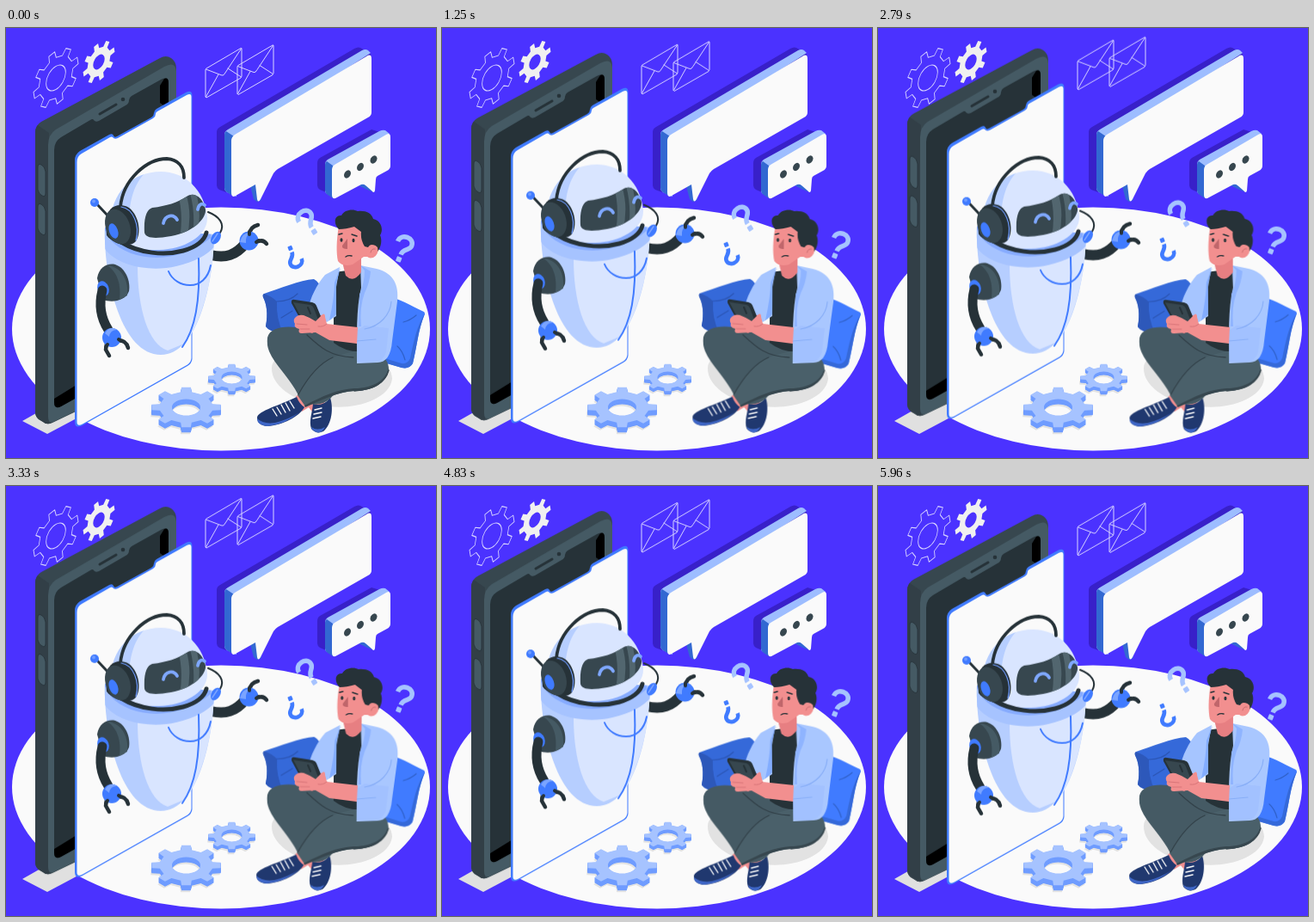
An HTML page for the animation above (6 s loop, 500x500 px).

```html
<!DOCTYPE html>
<html lang="en">
<head>
<meta charset="utf-8">
<title>Chatbot assistant</title>
<style>
html, body { margin: 0; width: 100%; height: 100%; overflow: hidden; background: #4b32ff; }
svg { display: block; width: 100vw; height: 100vh; }
.float { animation: float 6s linear infinite; }
.quick { animation-duration: 3s; }
.sway { transform-origin: 393px 342px; animation: sway 3s linear infinite; }
@keyframes float { 50% { transform: translateY(-10px); } }
@keyframes sway {
  0%, 100% { transform: rotate(0); }
  25% { transform: rotate(1deg); }
  75% { transform: rotate(-1deg); }
}
.line { fill: none; stroke-linecap: round; stroke-linejoin: round; }
.ink { stroke: #263238; }
.blue { stroke: #407bff; }
.lace { stroke: #fafafa; stroke-width: 1.4; }
</style>
</head>
<body>
<svg viewBox="0 0 500 500">
<defs>
  <g id="ask">
    <path class="line" style="stroke-linecap:butt" stroke="currentColor" stroke-width="5.5" d="M-9-5C-9-16 8-16 8-6C8 0 0 0 0 8"/>
    <rect x="-3" y="11" width="6" height="6" rx="1" fill="currentColor"/>
  </g>
  <g id="mail" class="line" stroke="#d9d5ff" stroke-width="1">
    <path d="M1 24L41 .5Q42 0 42 1V33L41 35L1 58L0 57V26Z"/>
    <path d="M.5 25L19 32Q21 33 23 29L41.500 1M.500 57L15 31M41.500 34L26 24"/>
  </g>
  <clipPath id="egg"><path d="M115 232C113 285 132 380 180 380C222 380 241 300 242 240Z"/></clipPath>
  <clipPath id="dome"><path d="M122 240C117 196 144 167 180 167C208 167 231 188 234 220C235 242 207 257 178 258C150 259 126 251 122 240Z"/></clipPath>
  <clipPath id="visor"><path d="M161 238C160 219 164 211 170 209C187 207 199 203 210 196C218 190 229 196 232 211C233 221 219 237 192 242C174 245 163 245 161 238Z"/></clipPath>
</defs>

<rect width="500" height="500" fill="#4b32ff"/>
<ellipse cx="250" cy="350" rx="243" ry="141.500" fill="#fafafa"/>
<path d="M19 457L48 472L95 447L70 428Z" fill="#e0e0e0"/>
<path d="M309 395C310 376 350 368 385 370C425 374 449 390 449 408C446 432 405 444 375 440C340 437 308 418 309 395Z" fill="#e2e2e2"/>

<g id="gears"></g>

<!-- phone -->
<g class="float">
  <path d="M34 122Q34 113 41 109L179 35Q186 31 192 35Q198 39 198 47V390L54 459Q48 462 43 458L38 455Q34 452 34 446Z" fill="#37474f"/>
  <path d="M34 122Q34 116 37 113L50 122V460Q46 461 43 458L38 455Q34 452 34 446Z" fill="#323f47"/>
  <path d="M49 136Q49 124 58 118L184 45Q197 38 198 50V388L57 457Q49 461 49 452Z" fill="#455a64"/>
  <path d="M56 142Q56 132 64 127L98 107Q101 105 102 107Q104 110 108 108L139 90Q143 88 143 84Q143 81 146 79L180 60Q189 55 189 64V370L64 440Q56 444 56 435Z" fill="#263238"/>
  <path d="M179 67L184 59Q189 57 189 64V94L179 87ZM56 431L82 415V430L64 440Q56 444 56 435Z" fill="#000"/>
  <path class="line ink" stroke-width="3" d="M109 100L128 89"/>
  <circle cx="136" cy="83" r="2.300" fill="#263238"/>
  <g fill="#455a64" stroke="#263238" stroke-width=".8">
    <path d="M37 162Q37 157 41 159T46 167V192Q46 197 42 195T37 188Z"/>
    <path d="M37 208Q37 203 41 205T46 213V237Q46 242 42 240T37 233Z"/>
  </g>
  <path d="M80 154Q80 147 86 143L120 124Q124 122 125 125Q126 128 129 126L169 104Q172 102 172 99Q172 96 175 94L209 75Q216.500 71 216.500 79V385Q216 390 211 393L88 462.500Q80 466 80 458Z" fill="#407bff"/>
  <path d="M82.500 156Q82.500 149 88 146L121 127Q123 126 124 127Q126 130 130 128L171 105Q174 103 174 100Q174 98 176 97L210 78Q215.500 75 215.500 80V384Q215 389 211 391.500L89 460.500Q82.500 464 82.500 458Z" fill="#fafafa"/>
</g>

<!-- robot -->
<g class="float quick">
  <path class="line ink" stroke-width="12" style="stroke-linecap:butt" d="M238 264C256 268 267 264 278 251"/>
  <g clip-path="url(#egg)">
    <rect x="110" y="225" width="140" height="160" fill="#b6ceff"/>
    <path d="M153 277C153 325 165 368 188 375L212 365Q240 310 244 240Z" fill="#d9e5ff"/>
    <path d="M112 230L115 257C130 277 168 284 198 277C221 272 237 262 244 252V230Z" fill="#a6c3ff"/>
    <path d="M112 230L122 247C145 272 200 276 238 244V230Z" fill="#86abff"/>
  </g>
  <path class="line blue" stroke-width="2" d="M189 283C197 303 232 308 238 276M224 268C226 318 220 350 205 371"/>

  <g clip-path="url(#dome)">
    <rect x="115" y="160" width="125" height="100" fill="#d9e5ff"/>
    <path d="M115 160H172C149 176 139 199 144 260H115Z" fill="#b6ceff"/>
  </g>
  <path class="line ink" stroke-width="5" d="M134 249C155 262 184 265 206 259C221 255 231 247 233 238"/>
  <g clip-path="url(#visor)">
    <rect x="158" y="180" width="80" height="70" fill="#37474f"/>
    <path d="M199 190L207 186Q218 214 210 245H202Q207 215 199 190ZM212 186L219 184Q229 214 222 241L217 243Q221 211 212 186Z" fill="#52666f"/>
  </g>
  <g class="line" stroke="#7fa8ff" stroke-width="3.800">
    <path d="M183 227C185 217 195 216 199 223"/>
    <path d="M223 211C224 205 228 203 231 206"/>
  </g>
  <path class="line ink" stroke-width="3.800" d="M133 208C136 176 164 152 187 152C200 153 207 161 207 174"/>
  <path class="line ink" stroke-width="3" d="M120 220L105 204"/>
  <circle cx="103" cy="203" r="5" fill="#407bff"/>
  <circle cx="102" cy="201.500" r="2" fill="#6e9cff"/>
  <path d="M116 224C118 208 130 202 143 209C155 218 158 240 150 249C142 256 124 251 117 241Z" fill="#263238"/>
  <path d="M134 208C148 210 156 230 151 247" class="line" stroke="#6f9cff" stroke-width="1.200"/>
  <ellipse cx="130" cy="231" rx="14" ry="21" transform="rotate(-20 130 231)" fill="#37474f"/>
  <ellipse cx="125" cy="236" rx="5" ry="9" transform="rotate(-20 125 236)" fill="#407bff"/>
  <path class="line ink" stroke-width="2" d="M235 214C248 219 255 228 249 238"/>
  <ellipse cx="244" cy="244" rx="5" ry="8" transform="rotate(32 244 244)" fill="#407bff"/>
  <path class="line" stroke="#80a7ff" stroke-width="1.500" d="M240 248L246 239"/>

  <path d="M106 291C108 278 118 273 127 275C139 279 145 294 143 306C139 317 124 320 113 316Z" fill="#37474f"/>
  <path d="M118 276C136 278 143 296 141 311L132 316C134 298 130 285 118 276Z" fill="#455a64"/>
  <ellipse cx="113" cy="303" rx="6.500" ry="9" transform="rotate(-20 113 303)" fill="#407bff"/>
  <path class="line ink" stroke-width="11" d="M112 305C108 321 110 337 119 351"/>
  <g class="line ink" stroke-width="4.500">
    <path d="M117 367L116 374L120 381M130 363Q140 363 142 372"/>
    <path d="M283 240Q284 231 293 229M291 249Q299 245 303 251"/>
  </g>
  <circle cx="123" cy="360" r="11" fill="#407bff"/>
  <circle cx="282.500" cy="247.500" r="11" fill="#407bff"/>
  <path d="M115 355Q121 345 129 351Q121 351 120 359ZM272 249Q275 237 284 238Q278 242 279 250Z" fill="#7aa4ff"/>
  <path class="line ink" stroke-width="4" d="M118 368L116 371M131 362L134 364M283 240L283 237M291 249L294 247"/>
</g>

<!-- speech bubbles -->
<g fill="#3820c9">
  <path d="M245 121Q245 117 249 115L405 24Q410 21 414 24L424 30V96L302 162L286 182L256 191L248 188Q245 186 245 183Z"/>
  <path d="M362 157Q362 153 365 151L425 118L438 122V155L408 180L372 191L365 188Q362 186 362 183Z"/>
</g>
<path d="M254 124Q254 120 258 118L414 26Q418 24 421 26L424 29L268 130V196L257 191Q254 189 254 186Z" fill="#9dbdff"/>
<path d="M254 124Q254 121 256 120L265 126V196L257 191Q254 189 254 186ZM284 184L291 180L297 200L292 202L288 199Z" fill="#3268d2"/>
<path d="M262 131Q262 127 266 124L419 33Q425 29 425 36V98Q425 102 421 104L316 164Q313 166 311 169L296 199Q293 204 292 199L290 182L267 195Q262 198 262 191Z" fill="#fafafa"/>
<path d="M371 159Q371 155 374 153L434 120Q438 118 441 119L446 123L383 163V197L374 193Q371 192 371 189Z" fill="#9dbdff"/>
<path d="M371 159Q371 156 373 155L380 160V198L374 194Q371 192 371 189ZM410 183L417 179L428 191L420 188Z" fill="#3268d2"/>
<path d="M379 165Q379 161 382 159L442 124Q447 121 447 127V160Q447 164 443 166L432 172Q430 173 430 176L429 189Q428 193 425 189L418 183Q416 181 413 182L383 198Q379 199 379 194Z" fill="#fafafa"/>
<g fill="#37474f">
  <ellipse cx="397" cy="170" rx="3.600" ry="5" transform="rotate(30 397 170)"/>
  <ellipse cx="412" cy="161.500" rx="3.600" ry="5" transform="rotate(30 412 161.500)"/>
  <ellipse cx="427.500" cy="153" rx="3.600" ry="5" transform="rotate(30 427.500 153)"/>
</g>

<!-- seated man -->
<g class="sway">
  <path d="M300 309C318 303 342 293 358 292Q365 295 370 310L365 350L318 354Q306 353 302 347C305 332 303 321 299 313Q298 310 300 309Z" fill="#3569d9"/>
  <path d="M300 309Q309 312 315 318Q314 338 322 354Q307 354 302 347C305 332 303 321 299 313Q298 310 300 309Z" fill="#2d58ba"/>
  <path d="M315 318Q330 318 339 309M320 337L333 329" class="line" stroke="#2b55b4" stroke-width="1.200"/>
  <path d="M448 313C462 317 477 326 486 330Q488 332 486 335C479 352 478 370 473 390Q469 397 460 395L430 386Z" fill="#407bff"/>
  <path d="M487 332C479 352 478 370 473 390Q469 397 460 395L432 387L440 384L460 390Q467 391 470 384C474 365 478 345 487 332Z" fill="#3569d9"/>
  <path d="M462 342Q470 340 477 334M455 370Q461 375 464 386" class="line" stroke="#2f60c8" stroke-width="1.200"/>

  <path d="M337 428L350 423L357 438L344 446ZM346 434L368 428L372 440L356 446Z" fill="#f28f8f"/>
  <path d="M357 437Q368 441 377 430C381 442 379 461 369 469Q361 473 355 466C352 457 356 448 357 437Z" fill="#20386f"/>
  <path d="M355 464Q362 469 371 464Q367 472 361 470Q356 468 355 464Z" fill="#3e66c7"/>
  <path class="line lace" d="M359 444L367 442M358 449L367 447M357 454L366 452"/>
  <path d="M338 429Q341 437 347 441C341 452 321 462 304 463Q292 462 292 453C293 445 318 439 338 429Z" fill="#20386f"/>
  <path d="M292 454Q299 461 313 459Q329 455 341 447Q325 461 304 463Q292 462 292 454Z" fill="#3e66c7"/>
  <path class="line lace" d="M310 443L315 451M315 441L320 449M320 438L325 447M325 436L330 445M330 434L335 442"/>

  <path d="M304 360C307 347 328 345 348 350L412 368L400 405L377 431Q366 440 354 437L340 427C331 408 312 391 306 376Q303 369 304 360Z" fill="#455a64"/>
  <path d="M410 374C435 374 446 385 445 398C441 414 424 422 405 422C386 423 366 433 348 440L339 427C352 405 366 389 380 383Z" fill="#4a606a"/>
  <path class="line" stroke="#324149" stroke-width="1.300" d="M350 357C364 370 376 382 404 383M380 383C362 391 350 408 340 426M405 422C426 421 441 413 445 398"/>
  <path d="M445 394C443 409 427 419 405 419C386 420 368 428 347 439L348 441C366 433 386 423 405 422C424 422 444 415 445 394Z" fill="#37474f"/>

  <path d="M381 284L413 280L417 376Q396 378 381 366Z" fill="#263238"/>
  <path d="M388 278L371 287C361 299 354 313 351 328L373 342L384 335L384 301Z" fill="#a6c5ff"/>
  <path d="M389 278L384 297L384 333L376 340Q382 312 382 296Z" fill="#83adff"/>
  <path d="M412 276L431 280C451 285 457 299 455 318L449 364Q447 389 432 389L408 390C408 359 407 326 413 302Z" fill="#a9c7ff"/>
  <path d="M412 276L417 282Q417 296 411 310L410 347L413 347Q411 324 417 308Q423 296 424 283Z" fill="#8fb4ff"/>
  <path d="M417 346L445 349L442 377Q438 389 427 389L408 388V352Z" fill="#a2c1ff"/>
  <path class="line" stroke="#88aef7" stroke-width="1.200" d="M448 318C447 333 435 347 417 350M408 364L430 362"/>

  <path d="M391 272L395 288Q404 297 413 284V265Z" fill="#e77f82"/>
  <path d="M387 230C384 248 384 262 386 271Q391 278 403 275L416 266Q431 267 432 256L421 225Z" fill="#f28f8f"/>
  <path d="M387 234C380 227 382 217 390 218C393 211 404 210 409 213C418 212 425 215 427 222C437 224 439 235 435 241C439 250 433 261 429 263C432 254 425 248 421 255L417 254Q412 246 413 237Q409 234 405 231Q395 234 387 234Z" fill="#263238"/>
  <path d="M421 256Q427 249 432 255Q434 263 427 267Q419 269 419 262Z" fill="#f28f8f"/>
  <path d="M397 245L391 253Q390 257 397 257Z" fill="#c0666b"/>
  <g class="line ink" stroke-width="1.400">
    <path d="M387 240L391 239M402 240L408 242M395 266Q398 264 402 265"/>
  </g>
  <ellipse cx="390" cy="246.500" rx="1.500" ry="2.200" fill="#263238"/>
  <ellipse cx="404" cy="247" rx="1.500" ry="2.200" fill="#263238"/>
  <path class="line" stroke="#c96c70" stroke-width="1" d="M424 261Q425 256 429 257"/>

  <path d="M351 331L371 335L370 346L356 355L344 350Z" fill="#e77f82"/>
  <path d="M332 320Q331 315 336 316L356 319Q360 320 361 323L370 345Q370 349 366 349L350 345Q345 344 343 340Z" fill="#263238"/>
  <path d="M334 319L354 322Q357 323 358 326L366 347L350 343Q346 342 344 338Z" fill="#37474f"/>
  <path class="line ink" stroke-width="2" d="M351 325L354 332"/>
  <path d="M337 336Q340 333 346 334L353 337L360 341L368 333Q371 331 371 336L373 344L409 348L408 367L376 363L360 354L344 355Q339 355 341 350Q334 348 336 344Q333 339 337 336Z" fill="#f28f8f"/>
  <path class="line" stroke="#d87478" stroke-width="1" d="M338 344L350 345M342 350L353 350M373 344Q369 348 363 347"/>
</g>

<!-- floating marks -->
<g class="float">
  <use href="#ask" transform="translate(351 225) rotate(-32)" color="#a6c3ff"/>
  <use href="#ask" transform="translate(462 256) rotate(22)" color="#a6c3ff"/>
  <use href="#ask" transform="translate(335 267) rotate(158) scale(.85)" color="#407bff"/>
  <use href="#mail" x="232" y="23"/>
  <use href="#mail" x="269" y="19.500"/>
</g>
</svg>

<script>
const svgNS = "http://www.w3.org/2000/svg";
const layer = document.getElementById("gears");

// Toothed ring around the origin with a round hole
function gearPath(outer, root, hole, teeth, turn) {
  const step = 2 * Math.PI / teeth;
  const points = [];
  for (let i = 0; i < teeth; i++) {
    for (const [r, part] of [[root, -.26], [outer, -.17], [outer, .17], [root, .26]]) {
      const a = (i + part) * step + turn;
      points.push((r * Math.cos(a)).toFixed(2) + " " + (r * Math.sin(a)).toFixed(2));
    }
  }
  return `M${points.join("L")}ZM${hole} 0A${hole} ${hole} 0 1 0 ${-hole} 0A${hole} ${hole} 0 1 0 ${hole} 0Z`;
}

function addGear(d, matrix, style) {
  const path = document.createElementNS(svgNS, "path");
  const attrs = { d, transform: `matrix(${matrix})`, "fill-rule": "evenodd", "stroke-linejoin": "round", ...style };
  for (const key in attrs) path.setAttribute(key, attrs[key]);
  layer.append(path);
}

function floorGear(x, y, r, hole, depth) {
  const d = gearPath(r, r * .77, hole, 8, Math.PI / 2);
  addGear(d, [1, 0, 0, .58, x - 1, y + depth + 2], { fill: "#e2e2e2" });
  for (let z = depth; z > 0; z -= .5) addGear(d, [1, 0, 0, .58, x, y + z], { fill: "#6f9cff" });
  addGear(d, [1, 0, 0, .58, x, y], { fill: "#a6c3ff" });
}

floorGear(209.500, 441, 40.500, 16.500, 6);
floorGear(262.500, 406.500, 27.500, 12, 4);
addGear(gearPath(31, 23.500, 13.500, 8, .6), [.84, -.48, 0, 1, 58, 58],
  { fill: "none", stroke: "#d9d5ff", "stroke-width": 1 });
addGear(gearPath(22, 16, 8, 8, .6), [.84, -.48, 0, 1, 108, 39.500], { fill: "#f0f0f0" });
</script>
</body>
</html>
```
